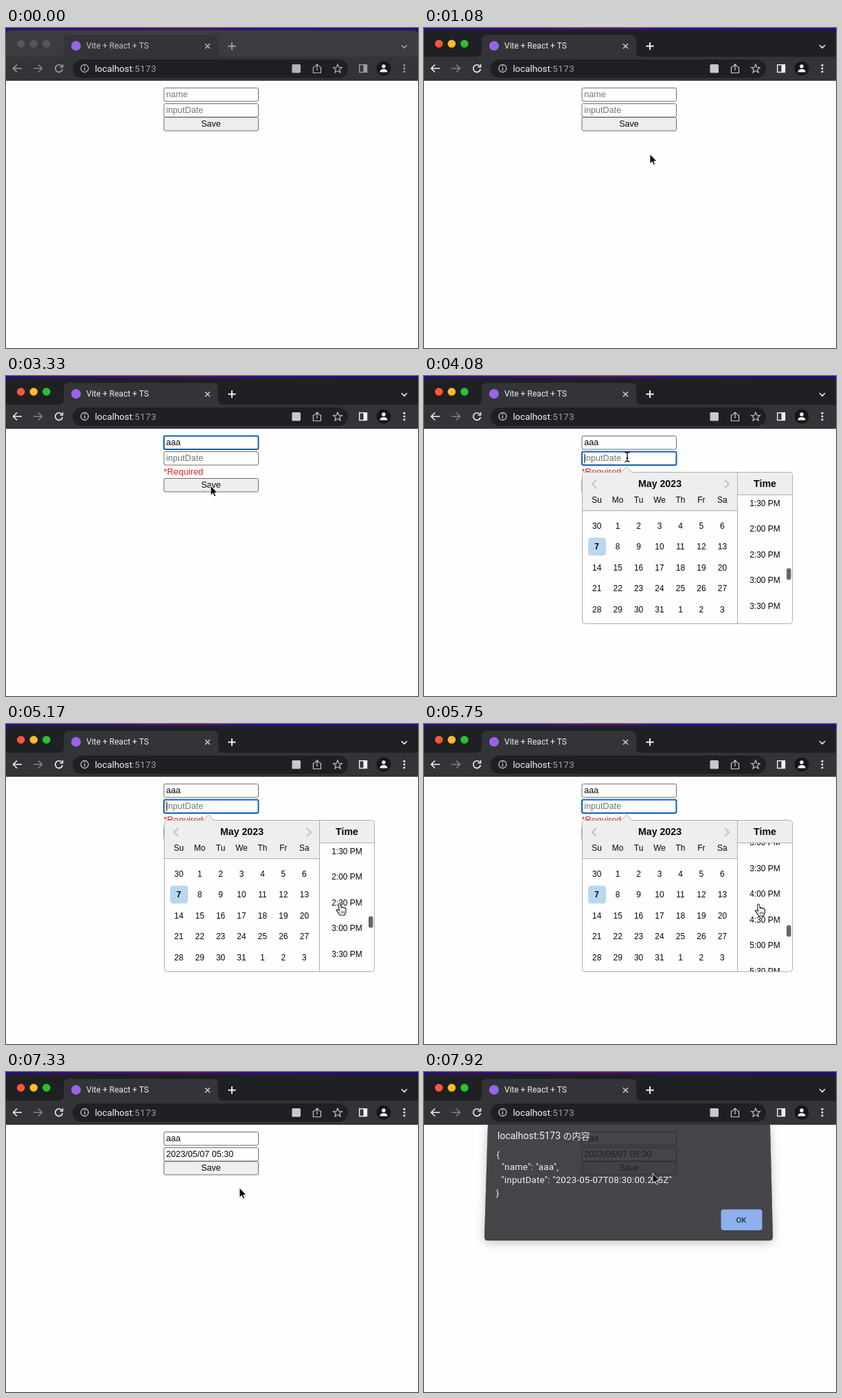
Recreate the animation shown at these times as an HTML page. Size 600x467 px, loop 8 s.

```html
<!DOCTYPE html>
<html lang="en">
<head>
<meta charset="utf-8">
<title>Form demo</title>
<style>
  html, body { margin: 0; width: 100%; height: 100%; overflow: hidden; background: #fefefe; }
  svg { display: block; width: 600px; height: 467px; }
  text { font: 12.6px "Liberation Sans", Arial, sans-serif; fill: #080808; white-space: pre; }
  .ui { font-family: Roboto, "Noto Sans CJK JP", sans-serif; }
  .mid { text-anchor: middle; }
  .day { font-size: 12px; text-anchor: middle; }
  .head { font-size: 14.2px; font-weight: bold; text-anchor: middle; }
  .line { fill: none; stroke-width: 1.6; }
</style>
</head>
<body>
<svg id="stage" viewBox="0 0 600 467"></svg>
<script>
const LOOP = 8000, STEP = LOOP / 96;
const ACTIVE = 830, SUBMIT = 1660, TYPE = [2910, 3080, 3240], OPEN = 3910, PICK = 6490, ALERT = 7830;
const PALE = '#eeeeee', EDGE = '#aeaeae';

// Pointer keys: time, x, y
const PATH = [
  [330, 420, 436], [750, 352, 250], [1080, 329, 184], [1250, 329, 184], [1580, 301, 138],
  [2400, 301, 138], [2750, 298, 160], [3330, 298, 160], [3830, 296, 118], [4500, 296, 118],
  [5200, 487, 263], [6080, 487, 263], [6250, 487, 270], [6660, 487, 262], [6950, 487, 262],
  [7330, 340, 169], [7700, 333, 148], [8000, 333, 148]
];

const ease = u => u * u * (3 - 2 * u);
const clamp = u => Math.max(0, Math.min(1, u));
const text = (x, y, s, cls = '', extra = '') => `<text x="${x}" y="${y}" class="${cls}" ${extra}>${s}</text>`;
const rect = (x, y, w, h, fill, extra = '') =>
  `<rect x="${x}" y="${y}" width="${w}" height="${h}" fill="${fill}" ${extra}/>`;
const circle = (x, y, r, fill, extra = '') => `<circle cx="${x}" cy="${y}" r="${r}" fill="${fill}" ${extra}/>`;
const line = (d, color, extra = '') => `<path class="line" d="${d}" stroke="${color}" ${extra}/>`;

function pointerAt(t) {
  const i = Math.max(1, PATH.findIndex(k => k[0] > t));
  const [t0, x0, y0] = PATH[i - 1], [t1, x1, y1] = PATH[i];
  const u = ease(clamp((t - t0) / (t1 - t0)));
  return [x0 + (x1 - x0) * u, y0 + (y1 - y0) * u];
}

function browser(on) {
  const strip = on ? '#1f2023' : '#3a3c40', bar = '#333438';
  const icon = on ? '#f4f4f4' : '#a0a0a2', soft = on ? '#c8c9cb' : '#b4b5b7', dim = '#828386';
  const lights = on ? ['#ff5540', '#febb2a', '#28c131'] : ['#55565c', '#55565c', '#55565c'];
  return rect(0, 0, 600, 12, 'url(#desk)') +
    `<path d="M0 77V11Q0 3 8 3H592Q600 3 600 11V77Z" fill="${strip}"/>` +
    `<path d="M76 42Q84 42 84 34V18Q84 10 92 10H301Q309 10 309 18V34Q309 42 317 42H600V77H0V42Z" fill="${bar}"/>` +
    lights.map((c, i) => circle(21.7 + i * 18.6, 23, 5.8, c)).join('') +
    circle(102, 26, 7, '#9a63e8') +
    text(117, 30.3, 'Vite + React + TS', 'ui', `style="font-size:12px;fill:${on ? '#ebecee' : '#c3c4c6'}"`) +
    line('M290 23L297 30M297 23L290 30', soft) +
    line('M323.500 26.500H334.500M329 21V32', icon, 'style="stroke-width:1.900"') +
    line('M576 25L580 29L584 25', icon) +
    line('M23 59H11M16 53.500L10.500 59L16 64.500', icon) +
    line('M40 59H52M47 53.500L52.500 59L47 64.500', dim) +
    line('M81 55.500A5.300 5.300 0 1 0 82.300 60M82.500 53V57H78.500', icon) +
    rect(97, 46, 401, 27, '#1f2023', 'rx="13.500"') +
    circle(114.5, 59, 5.5, 'none', `stroke="${soft}" stroke-width="1.300"`) +
    line('M114.500 58V62.200M114.500 55.500V57', soft, 'style="stroke-width:1.400"') +
    text(129.4, 63.8, 'localhost', 'ui', 'style="font-size:13.300px;fill:#f3f3f4"') +
    text(183.5, 63.8, ':5173', 'ui', 'style="font-size:13.300px;letter-spacing:.5px;fill:#9fa0a4"') +
    rect(416.5, 53, 12.5, 12.5, soft, 'rx="1.500"') +
    line('M450 57H447.500V65.500H458.500V57H456M453 62V53.500M450 56L453 53L456 56', soft, 'style="stroke-width:1.200"') +
    line('M483 53L484.800 57.300L489.300 57.600L485.800 60.500L487 65L483 62.600L479 65L480.200 60.500L476.700 57.600L481.200 57.300Z',
      soft, 'style="stroke-width:1.200"') +
    rect(514.7, 53.7, 10.8, 10.8, 'none', `stroke="${icon}" stroke-width="1.400"`) + rect(520.5, 53.5, 5.5, 11.5, icon) +
    circle(550, 59, 10.5, '#161719') + circle(550, 56, 2.7, '#f6f6f6') +
    `<path d="M544.500 64.500Q544.500 60 550 60T555.500 64.500Z" fill="#f6f6f6"/>` +
    [54.3, 59, 63.7].map(y => circle(580, y, 1.5, icon)).join('');
}

function field(y, value, hint, focus, caret) {
  const border = focus ? 'stroke="#105fbc" stroke-width="2"' : 'stroke="#6c6c6c"';
  const end = 233.5 + value.length * 7;
  return rect(230, y + .5, 137.5, 19.5, '#fefefe', `rx="2" ${border}`) +
    text(233.3, y + 14.4, value || hint, '', value ? '' : 'style="fill:#757575"') +
    (caret ? rect(end, y + 3.5, 1, 13.5, '#111') : '');
}

function form(t) {
  const sent = t >= SUBMIT, typed = TYPE.filter(k => t >= k).length;
  const nameBad = sent && !typed, dateBad = sent && t < PICK;
  const dateY = nameBad ? 128 : 110, saveY = dateY + (dateBad ? 39 : 20);
  const onName = sent && t < OPEN - 80, onDate = t >= OPEN - 80 && t < PICK;
  const caret = from => Math.floor((t - from) / 500) % 2 === 0;
  const error = y => text(229.5, y, '*Required', '', 'style="font-size:13px;fill:#e0221c"');
  const markup = field(87, 'a'.repeat(typed), 'name', onName, onName && caret(SUBMIT)) +
    (nameBad ? error(121.5) : '') +
    field(dateY, t >= PICK ? '2023/05/07 05:30' : '', 'inputDate', onDate, onDate && caret(OPEN - 80)) +
    (dateBad ? error(dateY + 34) : '') +
    rect(230, saveY + .5, 137.5, 19.5, PALE, 'rx="2" stroke="#6c6c6c"') +
    text(298.5, saveY + 14.4, 'Save', 'mid');
  return { markup, dateY };
}

function clock(i) {
  const h = i >> 1;
  return `${h % 12 || 12}:${i % 2 ? '30' : '00'} ${h < 12 ? 'AM' : 'PM'}`;
}

function picker(t) {
  const scroll = 205 * clamp((t - 5330) / 690);
  let s = rect(230.5, 140.5, 306, 221, '#fefefe', `rx="4" stroke="${EDGE}"`) +
    `<path d="M231 197V145Q231 141 235 141H532Q536 141 536 145V174H456V197Z" fill="${PALE}"/>` +
    `<path d="M286 141.500L295 132.500L304 141.500" fill="${PALE}" stroke="${EDGE}"/>` +
    line('M231 196.500H456.500M456.500 141V361M456.500 173.500H536', EDGE, 'style="stroke-width:1"') +
    line('M251 152L245 158L251 164M438 152L444 158L438 164', '#c6c6c6', 'style="stroke-width:2.400"') +
    text(343.5, 162, 'May 2023', 'head') + text(496.5, 162, 'Time', 'head') +
    rect(239, 236, 26, 26, '#b9d8ef', 'rx="4"');
  ['Su', 'Mo', 'Tu', 'We', 'Th', 'Fr', 'Sa'].forEach((d, i) => s += text(251.7 + i * 30.45, 185, d, 'day'));
  for (let i = 0; i < 35; i++) {
    const day = i === 0 ? 30 : (i - 1) % 31 + 1;
    s += text(251.7 + i % 7 * 30.45, 222.5 + Math.floor(i / 7) * 30.5, day, 'day', i === 7 ? 'style="font-weight:bold"' : '');
  }
  s += '<g clip-path="url(#times)">';
  for (let i = 26; i < 40; i++) s += text(496.5, 189.5 + (i - 27) * 37.5 - scroll, clock(i), 'day');
  return s + '</g>' + rect(528, 280.5 + scroll * .104, 6.5, 17, '#666666', 'rx="3.200"');
}

function alertBox(t) {
  const row = (x, y, s) => text(x, y, s, 'ui', 'style="font-size:13.200px;letter-spacing:.25px;fill:#f2f2f4"');
  return `<g opacity="${t < 7900 ? .4 : 1}">` +
    '<path d="M93 77H504L508 241Q508 246 503 246H93Q88 246 88 241Z" fill="#1f2023" fill-opacity=".8" filter="url(#glow)"/>' +
    text(107, 97.5, 'localhost:5173 <tspan style="font-size:13px">の内容</tspan>', 'ui', 'style="font-size:14px;fill:#f2f2f4"') +
    row(105.5, 124.5, '{') + row(113, 143, '"name": "aaa",') +
    row(112.5, 162, '"inputDate": "2023-05-07T08:30:00.265Z"') + row(105, 181, '}') +
    rect(432.5, 200.5, 60, 30.5, '#8eb0ec', 'rx="4"') +
    text(462, 219.8, 'OK', 'ui mid', 'style="font-size:11.500px;font-weight:500;fill:#2a3548"') + '</g>';
}

function pointer(t, dateY) {
  if (t < PATH[0][0]) return '';
  const [x, y] = pointerAt(t), open = t >= OPEN && t < PICK;
  const inField = x > 230 && x < 367 && ((y > 87 && y < 107) || (y > dateY && y < dateY + 20));
  let shape = '<path d="M0 0V14.200L3.300 11.200L5.400 16L7.700 15L5.700 10.400H10Z" fill="#0a0a0a" stroke="#fff" stroke-width=".9"/>';
  if (inField) shape = line('M-3.500 -7Q0 -7 0 -4.500Q0 -7 3.500 -7M0 -5V5M-3.500 7Q0 7 0 4.500Q0 7 3.500 7M-1.500 2H1.500', '#0a0a0a', 'style="stroke-width:1.300"');
  else if (open && y > 200) shape = '<path d="M-1.500 1Q0 -1.500 1.500 1L2.500 6Q4 4.300 5 6Q6.700 4.800 7.500 6.700Q9.300 6 9.500 8.500Q10 13 7.500 17H.5Q-1 13.500 -4.500 10Q-4.500 7.500 -.5 10Z" fill="#fff" stroke="#111" stroke-width="1.100"/>' +
    line('M2.500 11V14.500M4.700 11V14.500M6.800 11V14.500', '#111', 'style="stroke-width:.8"');
  return `<g transform="translate(${x.toFixed(1)} ${y.toFixed(1)})">${shape}</g>`;
}

const DEFS = `<defs>
  <linearGradient id="desk"><stop offset="0" stop-color="#2a0c84"/><stop offset=".3" stop-color="#3c0c74"/>
    <stop offset=".45" stop-color="#520c62"/><stop offset=".6" stop-color="#2c0c8c"/><stop offset="1" stop-color="#260a84"/></linearGradient>
  <clipPath id="times"><rect x="457" y="174" width="79" height="187"/></clipPath>
  <filter id="glow" x="-10%" y="-10%" width="120%" height="125%"><feDropShadow dx="0" dy="3" stdDeviation="7" flood-color="#000" flood-opacity=".3" result="shadow"/>
    <feComposite in="shadow" in2="SourceAlpha" operator="out"/><feMerge><feMergeNode/><feMergeNode in="SourceGraphic"/></feMerge></filter>
</defs>`;

function scene(t) {
  const { markup, dateY } = form(t);
  return DEFS + rect(0, 0, 600, 467, '#fefefe') + markup +
    (t >= OPEN && t < PICK ? picker(t) : '') +
    (t >= ALERT ? alertBox(t) : '') +
    browser(t >= ACTIVE) + pointer(t, dateY);
}

const stage = document.getElementById('stage');
let shown = -1;
function tick(now) {
  // Steps fall on times rounded to 10 ms, so allow a little lead
  const step = Math.floor((now % LOOP + 4) / STEP) % 96;
  if (step !== shown) stage.innerHTML = scene((shown = step) * STEP);
  requestAnimationFrame(tick);
}
tick(0);
</script>
</body>
</html>
```
